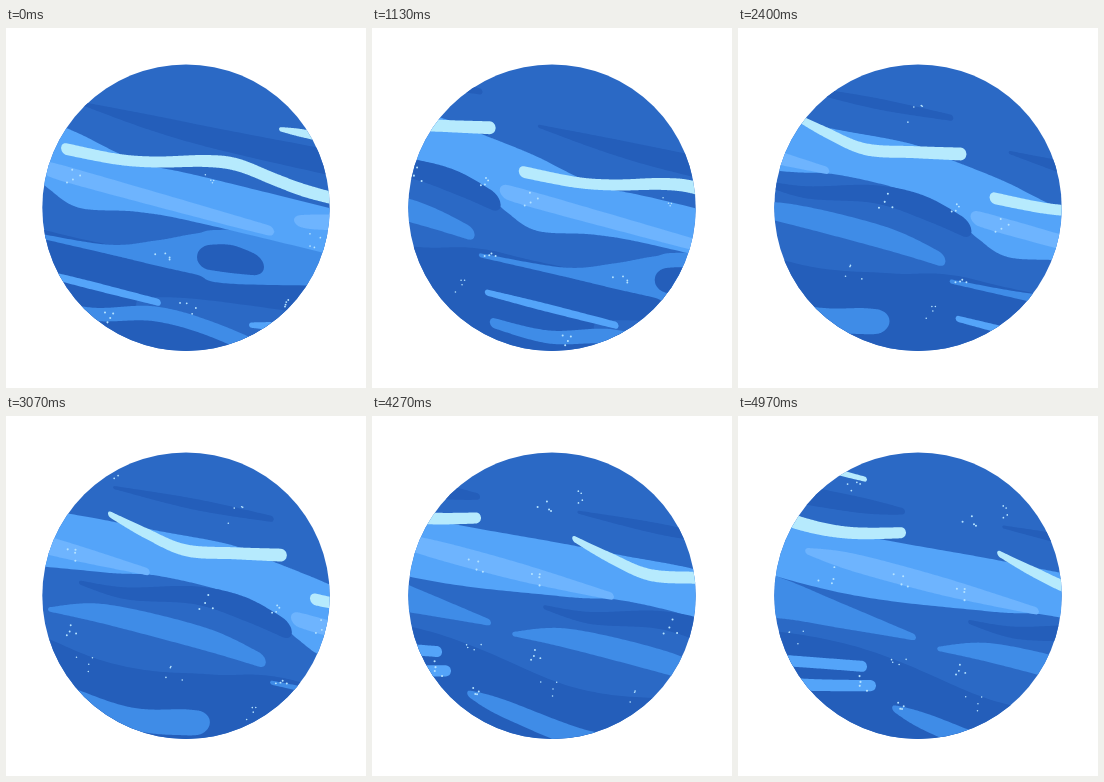
An HTML page that plays this animation: 360 px wide and 360 px high, repeating every 5.07 s.

```html
<!DOCTYPE html>
<html>
<head>
<meta charset="utf-8">
<title>Blue planet</title>
<style>
html, body { margin: 0; height: 100%; overflow: hidden; background: #fff; }
svg { display: block; width: 100vw; height: 100vh; }
</style>
</head>
<body>
<svg viewBox="0 0 360 360">
  <clipPath id="disc"><ellipse cx="180" cy="179.7" rx="143.7" ry="143.3"/></clipPath>
  <g clip-path="url(#disc)">
    <rect width="360" height="360" fill="#2b69c5"/>
    <g id="surface"></g>
  </g>
</svg>
<script>
const BASE = '#2b69c5', DARK = '#245eba', MID = '#3f8ce7', BAND = '#54a4f9', PALE = '#6eb4fe', ICE = '#b6eafd';
const surface = document.getElementById('surface');

function addPath(attributes) {
  const path = document.createElementNS('http://www.w3.org/2000/svg', 'path');
  for (const name in attributes) path.setAttribute(name, attributes[name]);
  surface.append(path);
}

const parse = text => text.split(' ').map(item => item.split(',').map(Number));

// Catmull-Rom spline through b and c
const spline = (a, b, c, d, t) =>
  b + t / 2 * (c - a + t * (2 * a - 5 * b + 4 * c - d + t * (3 * (b - c) + d - a)));

// Round-ended ribbon along a few "x,y,thickness" points
function streak(fill, text) {
  const points = parse(text), last = points.length - 1;
  const left = points[0][0], right = points[last][0];
  const upper = [], lower = [];
  const SAMPLES = 40;
  for (let i = 0; i <= last * SAMPLES; i++) {
    const k = Math.min(last - 1, Math.floor(i / SAMPLES));
    const near = [k - 1, k, k + 1, k + 2].map(n => points[Math.max(0, Math.min(last, n))]);
    const [x, y, thickness] = [0, 1, 2].map(axis => spline(...near.map(p => p[axis]), i / SAMPLES - k));
    const radius = thickness / 2;
    const gap = Math.max(0, 1 - Math.min(x - left, right - x) / radius);
    const half = radius * Math.sqrt(Math.max(0, 1 - gap * gap));
    upper.push([x, y - half]);
    lower.unshift([x, y + half]);
  }
  addPath({ d: 'M' + upper.concat(lower).join('L') + 'Z', fill });
}

// Deep shade and upper streaks
streak(DARK, '-600,240,300 -316,272,300 -147,334,300 -46,346,300 18,348,300 120,370,300 500,440,300');
streak(BASE, '130,276,12 200,284,24 400,335,70');
streak(DARK, '74,75,3 150,96,16 230,115,22 400,150,28');
streak(DARK, '-142,9,3 -60,26,11 19,41,6');
streak(DARK, '-380,-30,20 -286,-13,16 -239,-6,6');

// Lobes
streak(MID, '15,204,4 100,221,9 150,225,25 190,226,41 230,229,54 420,234,48');
streak(MID, '-207,131,4 -149,136,20 -49,161,23 11,184,13');
streak(MID, '-420,70,56 -361,81,40 -306,97,26 -228,120,6');
streak(MID, '-252,190,6 -217,205,18 -129,239,22 -69,244,26 -45,244,20');
streak(MID, '26,271,10 85,286,13 150,286,15 215,305,16 300,345,20');

// Main band
streak(BAND, '-480,0,50 -306,44,61 -157,67,53 -97,75,45 -24,91,49 20,112,56 43,127,68 74,143,74 133,159,50 200,173,47 400,222,46');
streak(DARK, '-176,104,4 -129,115,12 -60,117,18 -9,131,24 37,154,18');
streak(DARK, '191,229,22 225,231,28 258,239,18');

// Pale stripes
streak(PALE, '36,139,12 70,149,16 250,199,11 268,203,6');
streak(PALE, '-339,33,6 -290,45,18 -200,69,18 -105,94,7');
streak(PALE, '288,192,8 310,194,15 400,195,17');
streak(BAND, '21,241,6 80,256,8 155,275,7');
streak(BAND, '243,297,5 270,298,8 320,298,8');
streak(BAND, '-400,140,12 -330,145,11 -277,149,11');
streak(BAND, '-400,162,14 -340,167,12 -268,168,11');

// Icy streaks
streak(ICE, '55,120,12 110,131,11 150,134,11 200,133,12 232,137,13 270,152,13 300,163,13 345,175,12');
streak(ICE, '-147,35,6 -109,55,11 -69,72,12 -19,75,12 32,77,13');
streak(ICE, '-400,-16,16 -346,5,14 -296,15,12 -238,15,11');
streak(ICE, '-340,-54,7 -277,-38,5');
streak(ICE, '273,101,4 295,105,8 330,112,9');

// Small groups of specks
let seed = 7;
const random = () => (seed = seed * 16807 % 2147483647) / 2147483647;
const spread = range => (random() * 2 - 1) * range;
const groups = '70,147 204,149 156,226 307,212 182,279 107,287 282,278 22,127 24,207 -19,36 -49,123 -80,197 -6,234 '
  + '-187,80 -180,152 -170,186 -177,0 -139,-7 -245,60 -246,142 -245,191 -288,-30 -318,58 -348,122 -279,165';
for (const [x, y] of parse(groups)) {
  let d = '';
  for (let i = 0; i < 4; i++) d += `M${x + spread(9)} ${y + spread(9)}h.01`;
  addPath({ d, stroke: '#b4e2ff', 'stroke-width': 1.5 + random() * 0.6, 'stroke-linecap': 'round' });
}

// The surface drifts in 80 ms steps, shown on a 30 fps clock; the loop ends in a hard cut
const LOOP = 5070;
const start = performance.now();
function draw(now) {
  const time = Math.max(0, now - start) % LOOP;
  const tick = Math.floor((Math.floor(time / 10) * 10 + 5) * 0.03);
  const step = Math.min(62, Math.floor(tick * 5 / 12));
  surface.setAttribute('transform', `translate(${step * 6.55} ${step * 1.64})`);
  requestAnimationFrame(draw);
}
draw(start);
</script>
</body>
</html>
```
